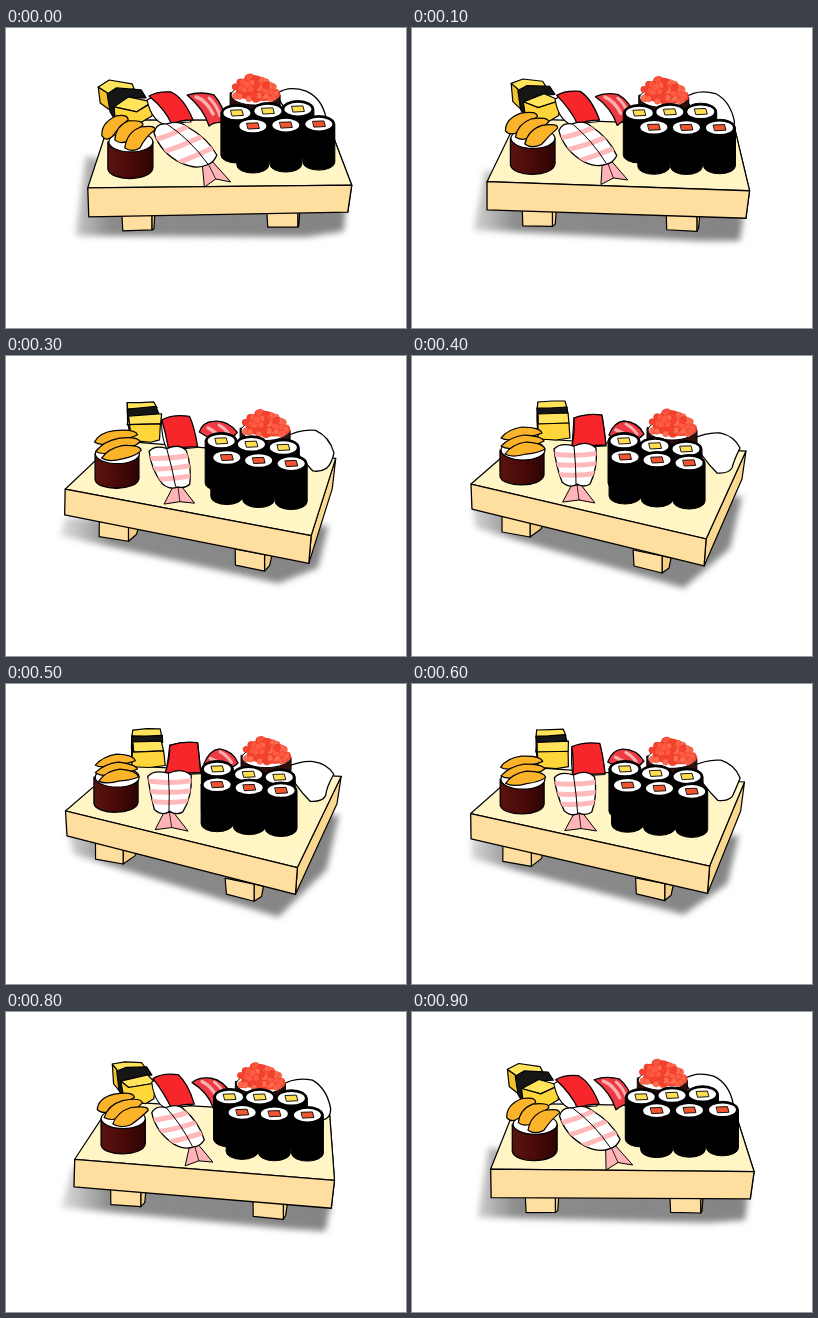
Animation of 400 by 300 pixels, one loop 1 s. Source, as an HTML page:

```html
<!DOCTYPE html>
<html lang="en">
<head>
<meta charset="utf-8">
<title>Sushi tray</title>
<style>
html, body { margin: 0; width: 100%; height: 100%; overflow: hidden; background: #fff; }
svg { display: block; width: 100vw; height: 100vh; }
</style>
</head>
<body>
<svg id="stage" viewBox="0 0 400 300" stroke-linejoin="round" stroke-linecap="round">
  <defs>
    <filter id="soft" x="-20%" y="-20%" width="140%" height="140%"><feGaussianBlur stdDeviation="3"/></filter>
    <linearGradient id="shade" gradientUnits="userSpaceOnUse" x1="48" y1="0" x2="330" y2="0">
      <stop offset="0" stop-color="#777" stop-opacity=".15"/>
      <stop offset=".2" stop-color="#777" stop-opacity=".85"/>
      <stop offset="1" stop-color="#777" stop-opacity=".9"/>
    </linearGradient>
    <linearGradient id="cup"><stop offset="0" stop-color="#5a1410"/><stop offset=".5" stop-color="#4a0a08"/><stop offset="1" stop-color="#2c0404"/></linearGradient>
    <clipPath id="shrimp"><path id="shrimpClip"/></clipPath>
  </defs>
</svg>
<script>
const NS = 'http://www.w3.org/2000/svg';
const stage = document.getElementById('stage');
const LOOP = 1000, STEP = 100, PEAK = 480;
const updates = [];

// Each pose is the tray turned by u = 0, 0.4 and 0.94; in between is a parabola.
function blend(a, b, c, u) {
  const p = 0.4, q = 0.94;
  return a * (u - p) * (u - q) / (p * q)
       + b * u * (u - q) / (p * (p - q))
       + c * u * (u - p) / (q * (q - p));
}

function morph(poses) {
  const nums = poses.map(s => s.match(/-?[\d.]+/g).map(Number));
  const ops = poses[0].split(/-?[\d.]+/);
  return u => ops.map((op, i) => i < nums[0].length
    ? op + blend(nums[0][i], nums[1][i], nums[2][i], u).toFixed(2) : op).join('');
}

function add(tag, attrs, parent = stage) {
  const el = document.createElementNS(NS, tag);
  for (const k in attrs) el.setAttribute(k, attrs[k]);
  return parent.appendChild(el);
}

function shape(fill, width, poses, extra = {}) {
  const el = add('path', { fill, stroke: width ? '#000' : 'none', 'stroke-width': width, ...extra });
  const at = morph(poses);
  updates.push(u => el.setAttribute('d', at(u)));
  return el;
}

const poly = (fill, width, ...poses) => shape(fill, width, poses.map(p => `M${p}Z`));
const line = (color, width, poses, extra = {}) =>
  shape('none', width, poses, { stroke: color, ...extra });

function group(poses) {
  const g = add('g', {});
  const at = morph(poses.map(p => `translate(${p})`));
  updates.push(u => g.setAttribute('transform', at(u)));
  return g;
}

function seeded(seed) {
  return () => (seed = (seed * 16807) % 2147483647) / 2147483647;
}

// Shadow
poly('url(#shade)', 0,
  '80,128 70,208 300,209 338,203 340,180',
  '64,160 52,191 280,220 315,221 322,190',
  '60,150 64,172 272,232 318,192 330,140').setAttribute('filter', 'url(#soft)');

// Feet
poly('#f5cf85', 1.2, '146,186 149,186 148,201 146,202', '131,177 137,178 136,187 131,192', '118,165 131,168 129,173 118,181');
poly('#ffdf9f', 1.2, '116,186 146,186 146,202 117,203', '101,174 131,177 131,192 101,189', '90,160 118,165 118,181 90,176');
poly('#f5cf85', 1.2, '292,183 294,183 293,198 292,199', '272,194 277,194 275,205 272,210', '250,200 259,202 257,212 250,217');
poly('#ffdf9f', 1.2, '261,183 292,183 292,199 262,199', '242,190 272,194 272,210 242,206', '221,194 250,200 250,217 222,210');

// Board
poly('#fbd88f', 1.2, '346,157 342,184 318,120 321,92', '322,172 319,200 322,135 325,104', '294,183 292,210 330,123 334,95');
poly('#fff5c5', 1.2, '82,160 346,157 321,92 104,92', '65,143 322,172 325,104 108,88', '59,128 294,183 334,95 112,82');
poly('#ffdf9f', 1.3, '82,160 346,157 342,184 83,189', '65,143 322,172 319,200 64,170', '59,128 294,183 292,210 60,153');

// Omelette
poly('#f2c22c', 1.2, '92,59 103,66 105,83 94,75', '111,50 115,57 117,78 112,70', '126,46 126,52 126,64 126,58');
poly('#ffe45c', 1.2, '92,59 103,52 126,56 128,61 103,66', '111,50 124,49 139,49 143,54 115,57', '126,46 140,45 153,45 155,52 125,53');
poly('#161616', 1.2,
  '101,66 110,60 135,62 140,70 124,70 109,79 109,92 104,84',
  '114,57 124,54 143,53 148,61 130,64 118,67 120,86 116,76',
  '125,52 138,52 155,51 156,58 138,59 126,59 126,82 125,64');
poly('#ffe45c', 1.2, '108,79 122,69 146,74 131,84', '117,66 147,61 151,70 121,73', '126,58 156,57 157,67 126,68');
poly('#ffd63a', 1.2, '108,79 131,84 147,74 146,88 132,96 109,92', '117,66 121,73 151,70 149,86 142,90 121,87', '126,60 126,68 157,67 158,82 144,84 126,83');

// Tuna
shape('#fff', 1.1, [
  'M141,72Q152,65 165,66Q178,72 185,94Q172,94 164,98Q146,96 141,72Z',
  'M148,69Q158,62 175,64Q184,74 187,93Q175,94 163,97Q150,92 148,69Z',
  'M162,62Q175,58 190,60Q192,71 194,90Q178,91 160,91Q161,76 162,62Z']);
shape('#f6262b', 1.3, [
  'M143,68Q152,63 165,64Q178,70 187,92Q172,92 166,97Q160,82 143,68Z',
  'M149,66Q158,60 175,62Q184,72 189,92Q175,92 165,96Q158,80 149,66Z',
  'M162,62Q175,57 190,59Q192,70 194,89Q178,90 160,90Q163,75 162,62Z']);

// Marbled slice
shape('#ee3a42', 1.3, [
  'M181,67Q195,63 208,67Q218,78 220,95Q208,93 203,98Q197,80 181,67Z',
  'M188,72Q193,65 205,66Q218,66 228,80Q222,85 209,95Q203,80 188,72Z',
  'M197,79Q202,66 212,65Q226,66 232,78Q225,86 215,85Q203,84 197,79Z']);
line('#f8b0ae', 3.5, ['M190,69Q200,72 207,86', 'M198,70Q207,75 212,84', 'M204,74Q212,77 218,82']);
line('#f8b0ae', 3, ['M203,70Q210,76 214,88', 'M210,70Q216,74 219,80', 'M214,68Q221,72 225,78']);

// Squid
shape('#fff', 1.3, [
  'M270,66Q282,57 300,63Q316,70 320,90Q318,100 310,102Q300,104 295,100Q280,85 270,66Z',
  'M277,76Q290,67 308,70Q322,78 326,98Q326,108 318,110Q310,112 305,110Q290,95 277,76Z',
  'M280,83Q295,76 308,77Q322,80 328,92Q322,104 320,112Q316,118 305,117Q290,102 280,83Z']);

// Roe
const roe = group(['250,61', '257,67', '261,68']);
add('path', { d: 'M-26,4V18A25,10 0 0 0 24,18V6Z', fill: '#30100c', stroke: '#000' }, roe);
add('ellipse', { cx: -1, cy: 6, rx: 24, ry: 10, fill: '#fff', stroke: '#000' }, roe);
const rnd = seeded(77);
add('path', { d: 'M-21,6Q-20,-4 -9,-13Q-2,-16 8,-11Q20,-4 21,8Q12,14 0,11Q-14,11 -21,6Z', fill: '#f4422f' }, roe);
for (let i = 0; i < 64; i++) {
  const x = rnd() * 42 - 21, top = -14 + Math.abs(x + 3) * 0.55;
  const y = top + rnd() * (10 - top);
  add('circle', { cx: x, cy: y, r: 2.8 + rnd(), fill: ['#ff5a42', '#f4422f', '#ff6c50'][i % 3], stroke: '#e33a28', 'stroke-width': 0.4 }, roe);
}

// Rolls
function roll(fill, h, ...poses) {
  const g = group(poses);
  add('path', { d: `M-16,0V${h}A16,8 0 0 0 16,${h}V0A16,8.5 0 0 0 -16,0Z`, fill: '#000', stroke: '#000' }, g);
  add('ellipse', { rx: 13.5, ry: 6.3, fill: '#fff' }, g);
  add('path', { d: 'M-6,-2.8L5,-3.2L6.5,2.4L-4.5,3Z', fill, stroke: '#000', 'stroke-width': 0.9 }, g);
}
const cucumber = '#ffdf50', salmon = '#f2552c';
roll(cucumber, 42, '292,81', '283,88', '274,93');
roll(cucumber, 42, '262,83', '251,86', '243,90');
roll(cucumber, 42, '231,85', '221,85', '212,85');
roll(salmon, 38, '313,96', '297,105', '277,107', );
roll(salmon, 39, '280,97', '264,103', '245,104');
roll(salmon, 39, '247,98', '232,101', '213,101');

// Shrimp
const body = [
  'M148,105Q150,95 160,96Q172,92 180,98Q202,110 211,127Q208,135 201,137Q190,142 175,135Q155,125 148,105Z',
  'M145,99Q150,92 160,95Q172,90 178,97Q190,110 194,128Q190,134 183,134Q174,137 165,131Q148,118 145,99Z',
  'M142,93Q148,86 162,90Q175,84 184,92Q186,112 178,128Q172,132 165,128Q158,133 150,126Q144,110 142,93Z'];
poly('#ffb4b8', 1,
  '197,138 207,134 225,154 210,151 199,159',
  '179,134 188,133 201,149 187,148 173,152',
  '160,129 169,129 183,147 167,144 151,146');
line('#000', 0.8, ['M203,137L210,151', 'M184,134L187,148', 'M165,129L167,144']);
shape('#fff', 1.3, body);
const clipAt = morph(body), clipEl = document.getElementById('shrimpClip');
updates.push(u => clipEl.setAttribute('d', clipAt(u)));
[
  ['M148,112Q164,108 180,99', 'M143,107Q162,106 184,100', 'M140,98Q163,101 188,97'],
  ['M158,124Q176,118 195,109', 'M147,118Q168,117 190,110', 'M140,108Q163,111 188,107'],
  ['M172,135Q190,128 209,119', 'M157,129Q175,126 196,120', 'M142,118Q163,121 186,117']
].forEach(band => line('#ffb9bb', 5, band, { 'clip-path': 'url(#shrimp)' }));
line('#000', 1, ['M161,96Q185,112 202,136', 'M160,95Q172,112 181,133', 'M162,90Q164,110 164,128']);

// Sea urchin
shape('url(#cup)', 1.3, [
  'M102,114V141C104,154 145,154 147,140V114Z',
  'M93,104V130C95,142 135,142 137,129V104Z',
  'M88,94V120C90,132 130,132 132,119V94Z']);
const rim = group(['125,114', '115,104', '111,94']);
add('ellipse', { rx: 22, ry: 10, fill: '#fff', stroke: '#000', 'stroke-width': 1.2 }, rim);
[
  ['M96,108Q95,95 110,88Q122,86 122,92Q112,100 106,109Q100,114 96,108Z',
   'M90,94Q92,83 108,80Q128,77 130,83Q122,88 110,93Q96,100 90,94Z',
   'M89,82Q96,73 110,71Q128,71 130,77Q124,80 110,81Q96,86 89,82Z'],
  ['M109,112Q110,98 122,93Q137,92 137,97Q128,104 122,113Q114,117 109,112Z',
   'M95,103Q100,91 115,87Q134,83 136,89Q130,96 116,102Q102,107 95,103Z',
   'M89,90Q98,81 112,79Q130,80 132,85Q126,89 112,90Q96,95 89,90Z'],
  ['M119,120Q121,104 135,99Q150,97 149,102Q140,108 134,120Q126,125 119,120Z',
   'M103,109Q108,98 122,94Q140,92 140,97Q134,104 122,110Q110,114 103,109Z',
   'M93,98Q100,88 114,86Q131,87 133,93Q127,97 114,98Q100,102 93,98Z']
].forEach(piece => shape('#fbb42a', 1.2, piece));

function draw(ms) {
  const t = Math.floor((ms % LOOP) / STEP) * STEP;
  const u = 0.5 + 0.5 * Math.cos(2 * Math.PI * (t - PEAK) / LOOP);
  updates.forEach(f => f(u));
}

const start = performance.now();
function tick() {
  draw(performance.now() - start);
  requestAnimationFrame(tick);
}
tick();
</script>
</body>
</html>
```
